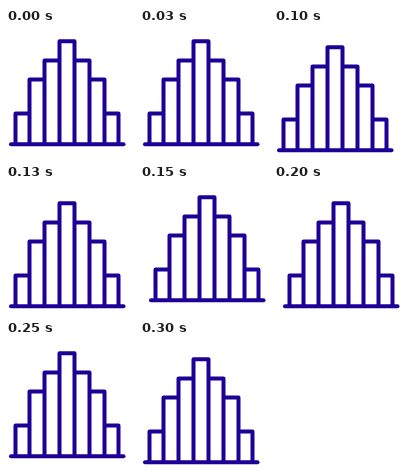
An HTML page for the animation above (350 ms loop, 128 px wide and 128 px high).

```html
<!DOCTYPE html>
<html>
<head>
<meta charset="utf-8">
<style>
html, body { margin: 0; width: 100%; height: 100%; overflow: hidden; background: #fff; }
svg { display: block; width: 128px; height: 128px; }
</style>
</head>
<body>
<svg viewBox="0 0 128 128">
  <g id="chart" fill="none" stroke="#1f0096" stroke-width="4" stroke-linejoin="round">
    <path d="M9.5 116V85.5H23.5M98.5 85.5H112.5V116"/>
    <path d="M23.5 116V51.5H38.5M83.5 51.5H98.5V116"/>
    <path d="M38.5 116V32.5H53.5M68.5 32.5H83.5V116"/>
    <path d="M53.5 116V13.2H68.5V116"/>
    <path d="M5 116.2H117.5" stroke-linecap="round"/>
  </g>
</svg>
<script>
const chart = document.getElementById("chart");
const STEP = 50, SHAKE = 6;
const jolts = [[0, 0], [1, 1], [0, 1], [1, 0], [1, 1], [0, 0], [0, 1]];
const start = performance.now();

function draw(now) {
  const step = Math.floor(Math.max(0, now - start) / STEP) % jolts.length;
  const [x, y] = jolts[step];
  chart.setAttribute("transform", `translate(${x * SHAKE} ${y * SHAKE})`);
  requestAnimationFrame(draw);
}
draw(start);
</script>
</body>
</html>
```
